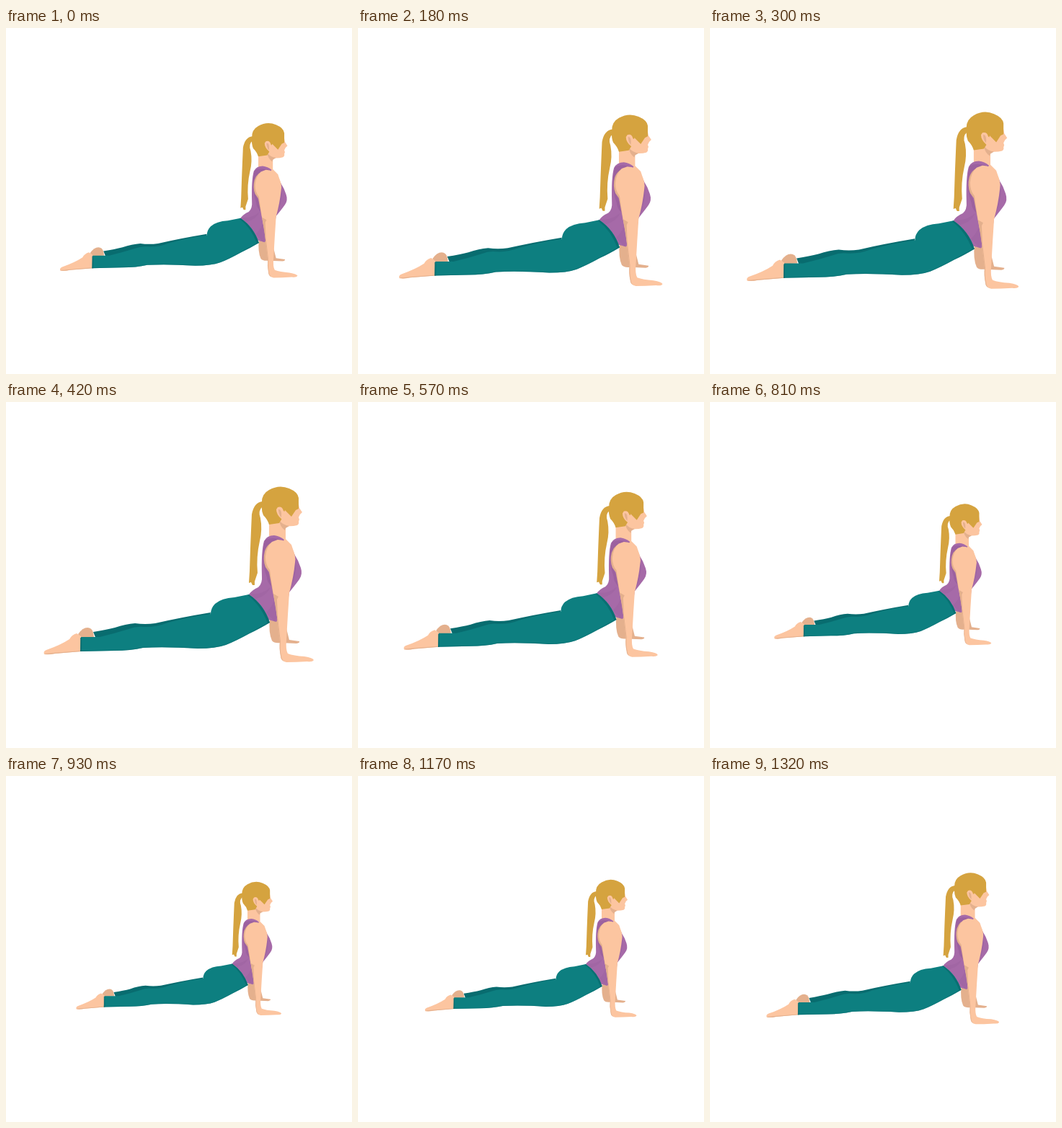
Recreate the animation shown at these times as an HTML page. Size 480x480 px, loop 1.35 s.

```html
<!DOCTYPE html>
<html lang="en">
<head>
<meta charset="utf-8">
<title>Cobra pose</title>
<style>
  html, body { margin: 0; width: 100%; height: 100%; overflow: hidden; background: #fff; }
  svg { display: block; width: 100vw; height: 100vh; }
  .skin { fill: #fcc5a0; }
  .shade { fill: #e4b08d; }
  .hair { fill: #d5a33f; }
  .top { fill: #a66aa8; }
  .fold { fill: #8d5492; }
  .legs { fill: #0d7f80; }
  .deep { fill: #086c6f; }
</style>
</head>
<body>
<svg viewBox="0 0 480 480">
  <g id="figure">
    <!-- far arm and foot -->
    <path class="shade" d="M366 300 Q364 320 369 331 Q372 335 381 334 L403 335 Q408 334 407 332 L393 330 L386 302Z"/>
    <path class="shade" d="M100 322 Q106 313 113 313 Q119 313 121 320 L122 326 L103 327Z"/>
    <!-- near foot -->
    <path class="skin" d="M104 325 L98 321 Q91 323 88 329 Q76 337 56 344 Q51 346 53 350 Q60 351 68 349 L104 346Z"/>
    <path class="shade" d="M53 349 Q58 349 66 348 L104 345 V346 L68 349 Q56 351 53 349Z"/>
    <!-- neck and face -->
    <path class="skin" d="M365 166 L365 187 L380 196 L401 213 L396 198 L388 190 L388 172 Q397 173 404 171 Q407 169 406 166 L407 163 L406 160 L408 156 L411 153 L407 147 L405 136 L376 140Z"/>
    <path class="shade" d="M379 164 Q384 171 393 172 L388 175 L387 178 Q380 173 379 164Z"/>
    <!-- torso -->
    <path class="top" d="M358 193 Q362 185 372 185 Q380 186 386 191 L384 194 Q394 204 400 211 Q406 220 409 230 Q412 239 407 246 Q402 253 393 264 L390 285 L375 305 L364 302 L337 267 Q341 261 350 257 Q356 252 355 241 Q354 207 358 193Z"/>
    <path class="fold" d="M359 192 Q368 186 385 192 L380 193 Q364 196 359 211 Q357 224 365 239 L369 257 Q362 250 362 243 Q353 219 359 192Z" opacity=".4"/>
    <path class="fold" d="M338 266 Q355 268 367 257 Q361 270 346 273Z M374 267 Q371 284 361 292 L373 305 L378 292Z" opacity=".2"/>
    <path class="fold" d="M400 211 Q404 225 401 239 Q399 251 393 264 L391 265 L394 240Z" opacity=".25"/>
    <!-- leggings -->
    <path class="deep" d="M121 319 Q139 316 151 313 Q166 308 179 307 Q193 309 207 307 Q242 299 284 292 L278 320 L125 329Z"/>
    <path class="legs" d="M104 326 L130 326 Q151 321 170 315 Q180 311 190 312 Q207 313 222 307 Q253 298 284 294 Q284 286 290 280 Q299 272 317 271 L337 267 Q358 281 366 306 Q351 315 338 321 Q318 332 305 337 Q291 342 266 342 Q219 339 190 341 Q173 345 150 345 L103 346Z"/>
    <path class="deep" d="M337 267 Q358 282 366 306 L363 307 Q354 282 335 268Z M103 327 H105 V346 H103Z" opacity=".8"/>
    <path class="deep" d="M103 345 L150 344 Q173 344 190 340 Q219 338 266 341 Q291 341 305 336 Q318 331 338 320 L365 305 L366 306 Q351 315 338 321 Q318 332 305 337 Q291 342 266 342 Q219 339 190 341 Q173 345 150 345 L103 346Z" opacity=".6"/>
    <!-- near arm -->
    <path class="shade" d="M378 192 Q363 194 359 207 Q356 219 360 229 L365 236 L371 268 L380 240Z"/>
    <path class="skin" d="M377 191 Q390 191 397 203 Q403 214 401 223 Q399 243 393 265 Q392 281 391 296 L389 331 Q388 344 391 349 Q399 352 414 353 Q426 355 427 358 Q425 361 418 360 Q402 361 389 361 Q382 360 381 352 Q379 343 380 332 L376 298 Q375 285 372 273 Q369 254 366 233 Q360 226 360 215 Q361 201 369 194Z"/>
    <path class="shade" d="M371 266 L378 270 L376 274 L377 298 L381 332 Q380 344 382 352 Q382 357 386 360 Q381 358 381 352 Q379 343 380 332 L376 298Z"/>
    <!-- hair -->
    <path class="hair" d="M356 138 Q344 139 341 156 Q340 178 339 204 L338 235 L337 251 L340 250 L342 254 L345 254 L345 249 L349 237 Q347 215 352 193 Q356 177 353 161 Q349 151 356 145Z"/>
    <path class="hair" d="M355 141 Q354 128 365 122 Q379 114 393 120 Q405 125 406 133 L406 148 L402 150 L396 159 L387 150 L384 160 L379 168 L365 170 Q363 163 357 157 Q354 150 355 141Z"/>
    <!-- ear -->
    <path class="skin" d="M377 146 Q383 144 385 151 L391 155 L389 161 L385 165 L382 162 Q375 156 375 149Z"/>
    <path class="shade" d="M378 149 Q383 148 382 160 Q378 156 378 149Z"/>
  </g>
</svg>
<script>
  const LOOP = 1350, STEP = 30;
  const figure = document.getElementById('figure');

  function draw(now) {
    const t = Math.floor((now % LOOP) / STEP) * STEP;
    const scale = 0.88 + 0.129 * Math.sin(2 * Math.PI * t / LOOP);
    figure.setAttribute('transform',
      `translate(239.8 239.6) scale(${scale}) translate(-239.8 -239.6)`);
    requestAnimationFrame(draw);
  }
  draw(performance.now());
</script>
</body>
</html>
```
